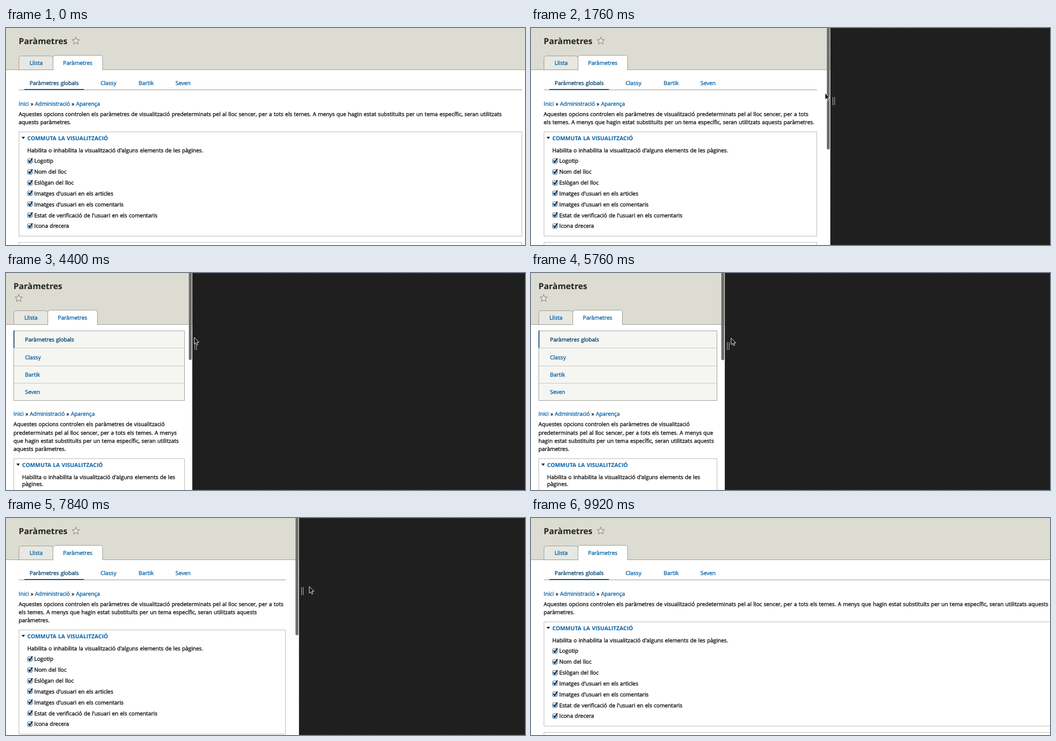
Animation, 900 px wide and 377 px high, one loop 10000 ms. Source, as an HTML page:

```html
<!DOCTYPE html>
<html lang="ca">
<head>
<meta charset="utf-8">
<title>Paràmetres</title>
<style>
html, body { margin: 0; width: 100%; height: 100%; overflow: hidden; background: #fff; }
svg { display: block; width: 900px; height: 377px; }
text {
  font: 9.46px "Open Sans", "Noto Sans", sans-serif;
  word-spacing: .5px; text-rendering: geometricPrecision;
  fill: #0c0c0c; stroke: #0c0c0c; stroke-width: .3px; white-space: pre;
}
.title { font-size: 14.6px; font-weight: 700; fill: #222; stroke: none; }
.head { font-size: 9.6px; font-weight: 700; fill: #005fa6; stroke: none; }
.link { fill: #005fa6; stroke: #005fa6; }
.on { fill: #003f6b; stroke: #003f6b; }
</style>
</head>
<body>
<svg id="stage" viewBox="0 0 900 377"></svg>
<script>
const stage = document.getElementById('stage');
const LOOP = 10000, STEP = 80, SIZE = 9.46;

const INTRO = 'Aquestes opcions controlen els paràmetres de visualització predeterminats pel al lloc sencer, per a tots els temes. A menys que hagin estat substituïts per un tema específic, seran utilitzats aquests paràmetres.';
const HELP = "Habilita o inhabilita la visualització d'alguns elements de les pàgines.";
const OPTIONS = ['Logotip', 'Nom del lloc', 'Eslògan del lloc', "Imatges d'usuari en els articles",
  "Imatges d'usuari en els comentaris", "Estat de verificació de l'usuari en els comentaris", 'Icona drecera'];
const THEMES = [['Paràmetres globals', 19], ['Classy', 142], ['Bartik', 208], ['Seven', 272]];

// time, page width
const WIDTH = [[0, 918], [1040, 746], [1760, 519], [2080, 458], [3200, 330], [4160, 324], [5200, 324],
  [5760, 336], [6240, 388], [7280, 415], [7840, 508], [8320, 655], [9040, 842], [9360, 915], [9920, 936]];
// time, pointer distance from the page edge, pointer height
const POINTER = [[0, -5, 113], [1760, -9, 113], [3200, 3, 112], [5200, 4, 112], [5760, 11, 113],
  [7280, 14, 114], [7840, 18, 119], [9040, 19, 128], [9920, 19, 128]];

// Smooth curve through the keys, flat at both ends
function smooth(keys, t, c = 1) {
  const n = keys.length - 1;
  if (t >= keys[n][0]) return keys[n][c];
  let i = 0;
  while (t >= keys[i + 1][0]) i++;
  const slope = k => k < 1 || k >= n ? 0 :
    (keys[k + 1][c] - keys[k - 1][c]) / (keys[k + 1][0] - keys[k - 1][0]);
  const [a, b] = [keys[i], keys[i + 1]], d = b[0] - a[0], u = (t - a[0]) / d, v = 1 - u;
  return v * v * (1 + 2 * u) * a[c] + u * u * (3 - 2 * u) * b[c]
    + d * u * v * (v * slope(i) - u * slope(i + 1));
}

const pen = document.createElement('canvas').getContext('2d');
pen.font = '100px "Open Sans", "Noto Sans", sans-serif';
const measure = s => pen.measureText(s).width * SIZE / 100 + (s.split(' ').length - 1) * .5;

function wrap(text, room) {
  const lines = [];
  let line = '';
  for (const word of text.split(' ')) {
    const next = line ? line + ' ' + word : word;
    if (line && measure(next) > room) { lines.push(line); line = word; }
    else line = next;
  }
  return [...lines, line];
}

const rect = (x, y, w, h, fill, more = '') =>
  `<rect x="${x}" y="${y}" width="${w}" height="${h}" fill="${fill}" ${more}/>`;
const frame = (x, y, w, h, fill, line) =>
  rect(x + .5, y + .5, w - 1, h - 1, fill, `stroke="${line}"`);
const path = (d, fill, more = '') => `<path d="${d}" fill="${fill}" ${more}/>`;
const text = (x, mid, s, cls = '') => `<text x="${x}" y="${mid + 3.4}" class="${cls}">${s}</text>`;

function star(x, y) {
  let pts = '';
  for (let i = 0; i < 10; i++) {
    const a = (i / 5 - .5) * Math.PI, r = i % 2 ? 2.9 : 6.8;
    pts += `${x + r * Math.cos(a)},${y + r * Math.sin(a)} `;
  }
  return `<polygon points="${pts}" fill="#e6e6df" stroke="#85796c" stroke-width=".9"/>`;
}

function tab(x, y, w, fill) {
  return path(`M${x + .5} ${y + 25}v-21q0-4 4-4h${w - 9}q4 0 4 4v21`, fill, 'stroke="#a3a39e"');
}

function checkbox(x, mid) {
  return rect(x + .5, mid - 4, 8, 8, '#a9d0f0', 'rx="1.5" stroke="#4677a3"')
    + rect(x + 1, mid - 3.5, 7, 3, '#d3e7f7')
    + path(`M${x + 2.2} ${mid - .8}l2 3 4.6-7`, 'none', 'stroke="#111" stroke-width="1.6"');
}

function header(W, m, bottom, tall) {
  const top = bottom - 24;
  return rect(0, 0, W, bottom, '#dcdcd3')
    + rect(0, bottom, W, 1, '#a6a6a2')
    + `<text x="${m}" y="28" class="title">Paràmetres</text>`
    + (tall ? star(m + 9, 44) : star(m + 99, 22.5))
    + tab(m, top + .5, 60, '#e8e8e2') + rect(m, bottom, 60, 1, '#a6a6a2')
    + tab(m + 59, top - .5, 87, '#fff') + rect(m + 60, bottom - 1, 85, 3, '#fff')
    + text(m + 19, bottom - 11.5, 'Llista', 'link')
    + text(m + 77, bottom - 11.5, 'Paràmetres', 'link');
}

// Draws the secondary tabs and returns the markup with its lower edge
function themes(m, right, y, stacked) {
  if (stacked) {
    const top = y + 11, row = 30.3;
    let out = frame(m, top, right - m, 122, '#f5f5f1', '#a9a9a4');
    THEMES.forEach(([name], i) => {
      if (i) out += rect(m + 1, Math.round(top + row * i), right - m - 2, 1, '#cdcdc8');
      out += text(m + 20, top + 16 + row * i, name, i ? 'link' : 'on');
    });
    return [out + rect(m, top, 1.5, 30, '#003f6b'), top + 122];
  }
  const broken = right - m < 306, base = y + (broken ? 57 : 35);
  let out = rect(m, base, right - m, 1, '#a0a0a0')
    + rect(m + 10, y + (broken ? 33.5 : 34), 103, 1.5, '#004875');
  THEMES.forEach(([name, x], i) => {
    const low = broken && i === 3;
    out += text(m + (low ? 142 : x), y + (low ? 46.5 : 24), name, i ? 'link' : 'on');
  });
  return [out, base];
}

function fieldset(m, right, top) {
  const help = wrap(HELP, right - m - 30), shift = 12 * (help.length - 1);
  const height = 182 + shift;
  let out = frame(m, top, right - m, height, '#fff', '#c0c0bc')
    + path(`M${m + 5} ${top + 9}h6l-3 4z`, '#222')
    + text(m + 15, top + 11.5, 'COMMUTA LA VISUALITZACIÓ', 'head');
  help.forEach((s, i) => out += text(m + 15, top + 32.5 + 12 * i, s));
  OPTIONS.forEach((s, i) => {
    const mid = top + 51 + shift + 18.83 * i;
    out += checkbox(m + 15, Math.round(mid)) + text(m + 27, mid, s);
  });
  return out + frame(m, top + height + 10, right - m, 60, '#fff', '#c0c0bc');
}

function outside(W, thumb, t) {
  const px = W + smooth(POINTER, t), py = smooth(POINTER, t, 2);
  const dots = 'stroke="#3c3c3c" stroke-dasharray="2 2"';
  return rect(W - 6, -4, 5, thumb + 4, '#6f6f6f', 'rx="2.5"')
    + rect(W, 0, 1000, 377, '#1f1f1f')
    + path(`M${W + .5} 377V.5H900M${W} 376.5H900`, 'none', dots)
    + rect(W + 4, 120, 1, 14, '#a5a8ab') + rect(W + 7, 120, 1, 14, '#a5a8ab')
    + path(`M${px} ${py}v11.5l2.6-2.4 1.7 4 1.9-.8-1.7-3.9h3.6z`, '#111', 'stroke="#eee" stroke-width=".9"');
}

function draw(t) {
  const W = Math.round(smooth(WIDTH, t));
  const narrow = W < 438, tall = W < 380, stacked = t >= 3440 && t < 5920;
  const m = narrow ? 13 : 22, right = W - (narrow ? 13 : 23);
  const bottom = tall ? 89 : 72;
  const [nav, edge] = themes(m, right, bottom, stacked);
  const crumb = edge + (stacked ? 22.5 : 24);
  const lines = wrap(INTRO, right - m);
  const link = s => `<tspan class="link">${s}</tspan>`;
  const boxTop = Math.round(crumb + 49 + 14.2 * (lines.length - 2));
  const thumb = 217 - (842 - W) * .0186 - (lines.length - 2) * 7 - (tall ? 21 : 0) - (stacked ? 21 : 0);

  stage.innerHTML = rect(0, 0, 900, 377, '#fff')
    + header(W, m, bottom, tall) + nav
    + text(m, crumb + .5, ['Inici', 'Administració', 'Aparença'].map(link).join(' » '))
    + lines.map((s, i) => text(m, crumb + 18.5 + 14.2 * i, s)).join('')
    + fieldset(m, right, boxTop)
    + outside(W, thumb, t);
}

let shown = -1;
function tick(now) {
  const t = Math.floor(now % LOOP / STEP) * STEP;
  if (t !== shown) draw(shown = t);
  requestAnimationFrame(tick);
}
tick(performance.now());
</script>
</body>
</html>
```
